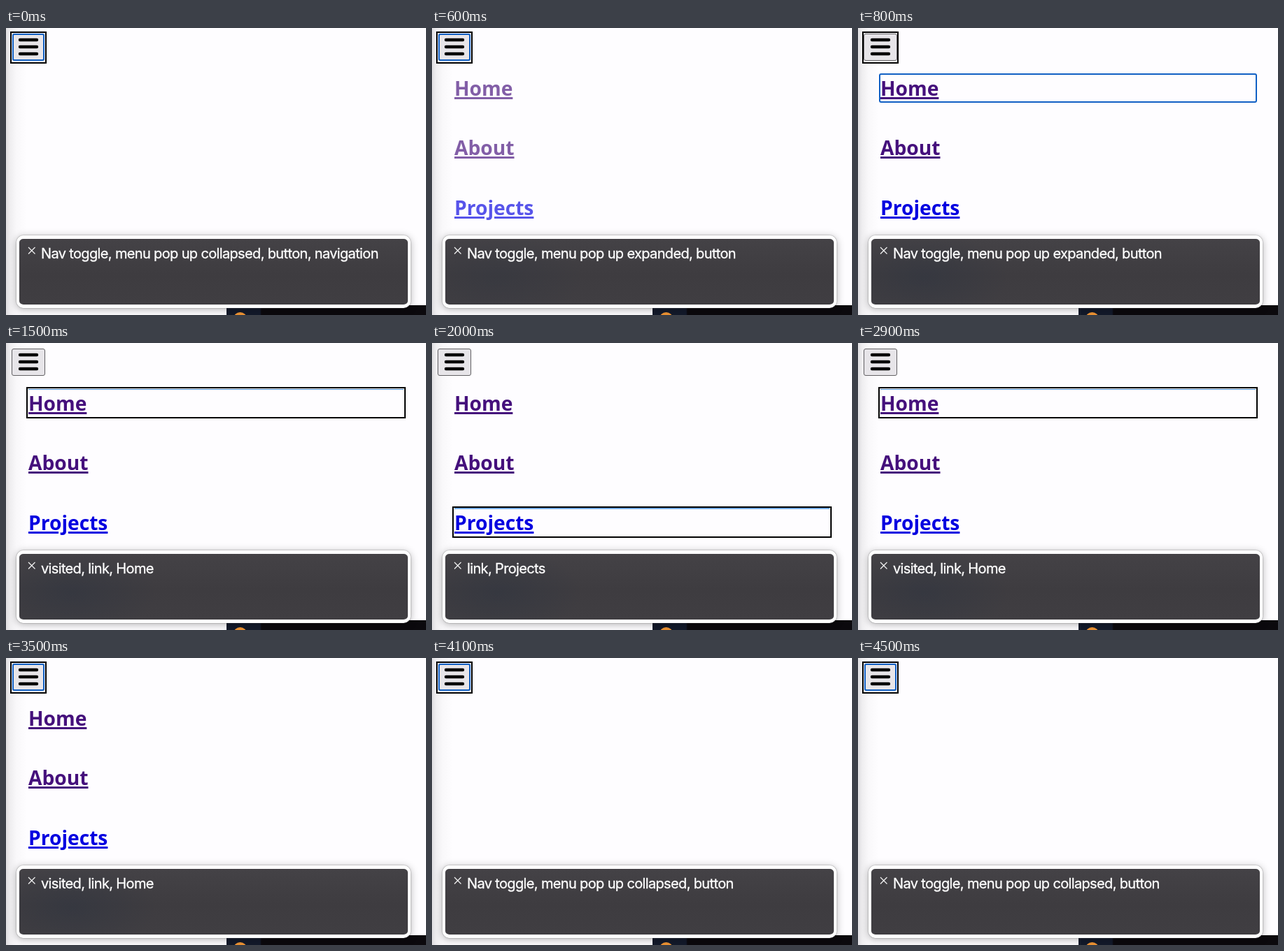
Write an HTML page that moves like this. It is 600 px wide and 411 px high and loops after 4600 ms.

```html
<!DOCTYPE html>
<html lang="en">
<head>
<meta charset="utf-8">
<title>Menu button with screen reader captions</title>
<style>
  html, body { margin: 0; width: 100%; height: 100%; overflow: hidden; background: #fefdff; }
  #stage { position: relative; width: 600px; height: 411px; overflow: hidden; }
  #stage > *, .link { position: absolute; box-sizing: border-box; }
  .edge { left: 0; top: 0; width: 30px; height: 411px;
    background: linear-gradient(90deg, #dedde0, #efeef0 20%, #f9f8fa 50%, #fefdff); }
  .button { left: 8px; top: 8px; width: 48px; height: 39px; background: #e7e5e9;
    border: 1px solid #626164; border-radius: 3px; }
  .bars { left: 0; top: 0; }
  .ring { border: 2px solid #1160c4; border-radius: 3px; }
  #buttonRing { left: 9px; top: 8px; width: 46px; height: 39px; box-shadow: 0 0 0 1px #f6f5f8; }
  #linkRing { left: 30px; top: 65px; width: 540px; height: 42px; }
  #cursor { border: 2px solid #000; }
  .link { left: 32px; font: bold 28.2px/40px "Open Sans", "Noto Sans", sans-serif; white-space: nowrap;
    text-decoration: underline; text-decoration-thickness: 2.6px; text-underline-offset: 2.4px; }
  .dock { left: 315px; top: 397px; width: 285px; height: 14px;
    background: linear-gradient(90deg, #131a2b 48px, #0b090d 50px); }
  .logo { left: 325px; top: 407px; width: 19px; height: 19px; border-radius: 50%; background: #ef9433; }
  .panel { left: 15px; top: 297px; width: 563px; height: 104px; border: solid #fff; border-width: 5px 4px;
    border-radius: 10px; background: linear-gradient(#444246, #3e3c40 55%, #403e42);
    box-shadow: 0 0 1.5px #555, 0 2px 12px rgba(0, 0, 0, .3); }
  #tint { left: 19px; top: 302px; width: 230px; height: 94px;
    background: radial-gradient(closest-side at 75px 55px, rgba(46, 52, 64, .5), transparent 160%); }
  #close { left: 31px; top: 313px; }
  #caption { left: 50px; top: 311px; color: #fff; white-space: nowrap; -webkit-text-stroke: .3px #fff;
    font: 20px/24px Inter, "Liberation Sans", sans-serif; letter-spacing: -.645px; }
</style>
</head>
<body>
<div id="stage">
  <div class="edge"></div>
  <div class="button"></div>
  <svg class="bars" width="60" height="50"><path d="M20 17H44M20 27H44M20 37H44" stroke="#000" stroke-width="4.4" stroke-linecap="round"/></svg>
  <div id="buttonRing" class="ring"></div>
  <div id="menu">
    <span class="link" style="top:66px;color:#45107c">Home</span>
    <span class="link" style="top:151px;color:#45107c">About</span>
    <span class="link" style="top:237px;color:#0500e0">Projects</span>
  </div>
  <div id="linkRing" class="ring"></div>
  <div id="hint"></div>
  <div id="cursor"></div>
  <div class="dock"></div>
  <div class="logo"></div>
  <div class="panel"></div>
  <div id="tint"></div>
  <svg id="close" width="12" height="12"><path d="M1 1L10.5 10.5M10.5 1L1 10.5" stroke="#f2f2f2" stroke-width="1.2"/></svg>
  <div id="caption"></div>
</div>
<script>
const LOOP = 4600, STEP = 100;
const $ = id => document.getElementById(id);

// Boxes: x, y, width, height, then colour and height of the inner top line
const boxes = {
  button:   [6, 5, 52, 46],
  home:     [29, 63, 542, 45, '#4c8fd0', 1],
  about:    [29, 148, 542, 45, '#77757a', 1],
  projects: [29, 234, 542, 45, '#74abe6', 2]
};
const toggle = 'Nav toggle, menu pop up ';

// Each track is a list of [start, value]
const captions = [
  [0, toggle + 'collapsed, button, navigation'],
  [600, toggle + 'expanded, button'],
  [1000, 'visited, link, Home'],
  [1700, 'visited, link, About'],
  [2000, 'link, Projects'],
  [2400, 'visited, link, About'],
  [2900, 'visited, link, Home'],
  [3600, toggle + 'expanded, button'],
  [4000, toggle + 'collapsed, button']
];
const cursors = [
  [0, 'button'], [900, 'home'], [1600, 'about'], [1900, 'projects'],
  [2300, 'about'], [2800, 'home'], [3500, 'button']
];
const rings = [[0, 'button'], [700, 'home'], [900, ''], [3500, 'button']];

const at = (track, t) => track.filter(k => k[0] <= t).pop()[1];
const ramp = (t, from, to) => Math.min(1, Math.max(0, (t - from) / (to - from)));
const show = (el, on) => el.style.visibility = on ? 'visible' : 'hidden';

function place(el, x, y, w, h) {
  Object.assign(el.style, { left: x + 'px', top: y + 'px', width: w + 'px', height: h + 'px' });
}

function draw(t) {
  const [x, y, w, h, line, thick] = boxes[at(cursors, t)];
  place($('cursor'), x, y, w, h);
  show($('hint'), line);
  if (line) {
    place($('hint'), x + 3, y + 4 - thick, w - 6, thick);
    $('hint').style.background = line;
  }
  const ring = at(rings, t);
  show($('buttonRing'), ring === 'button');
  show($('linkRing'), ring === 'home');
  const open = ramp(t, 400, 700) - ramp(t, 3700, 4100);
  $('menu').style.opacity = $('tint').style.opacity = open;
  const text = at(captions, t);
  if ($('caption').textContent !== text) $('caption').textContent = text;
}

const start = performance.now();
function tick() {
  const t = (performance.now() - start) % LOOP;
  draw(Math.floor(t / STEP) * STEP);
  requestAnimationFrame(tick);
}
tick();
</script>
</body>
</html>
```
